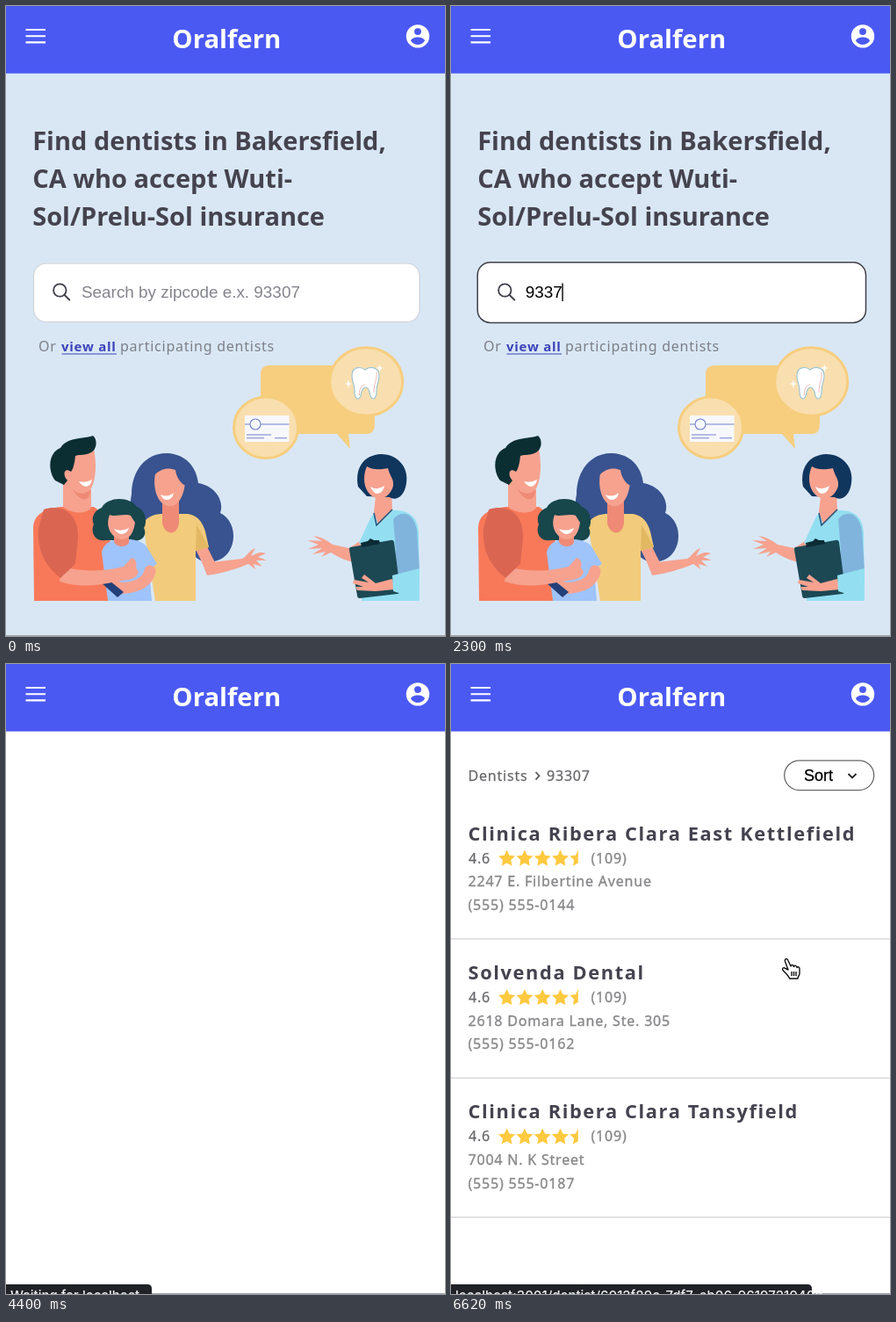
These frames come from a looping animation (500x717 px, 6740 ms). An HTML page:

```html
<!DOCTYPE html>
<html lang="en">
<head>
<meta charset="utf-8">
<title>Dentist finder</title>
<style>
html, body { margin: 0; width: 100%; height: 100%; overflow: hidden; background: #fff; }
svg { display: block; width: 500px; height: 717px; font-family: "Noto Sans", "Open Sans", sans-serif; }
.brand { font-size: 29.3px; font-weight: 700; fill: #fff; }
.hero { font-size: 29px; font-weight: 700; fill: #45434f; }
.hint { font-size: 16px; letter-spacing: .75px; fill: #7d7f87; }
.link { font-size: 15px; font-weight: 600; fill: #3b43b8; }
.field { font: 18.9px "Liberation Sans", Arial, sans-serif; }
.sort { font-size: 18px; stroke: #000; stroke-width: .3px; }
.option { font: 17px Inter, sans-serif; fill: #f1f1f2; }
.status { font: 500 15px Inter, sans-serif; fill: #f1f2f4; }
.name { font-size: 21.8px; font-weight: 700; letter-spacing: 1.62px; fill: #45434f; }
.info { font-size: 16px; letter-spacing: .8px; fill: #88888b; stroke: #88888b; stroke-width: .35px; }
.info.dark { fill: #68686c; stroke: #68686c; stroke-width: .25px; }
.skin { fill: #f6a28f; }
.skinline { fill: none; stroke: #f6a28f; stroke-linecap: round; stroke-linejoin: round; }
.shade { fill: #ee8a76; }
</style>
</head>
<body>
<svg viewBox="0 0 500 717" xmlns="http://www.w3.org/2000/svg">
  <rect id="page" width="500" height="717"/>

  <g id="home">
    <g class="hero">
      <text x="30.2" y="163.5">Find dentists in Bakersfield,</text>
      <text x="30.2" y="206.5">CA who accept Wuti-</text>
      <text x="30.2" y="249.600">Sol/Prelu-Sol insurance</text>
    </g>
    <text class="hint" y="393"><tspan x="37">Or</tspan><tspan class="link" x="63">view all</tspan><tspan x="130">participating dentists</tspan></text>
    <path d="M63.5 396H126" stroke="#3b43b8" stroke-width="1.2"/>

    <!-- speech bubble -->
    <g>
      <path fill="#f6ce7e" d="M300 409H410Q420 409 420 419V477Q420 487 410 487H390L392 504L377 487H300Q290 487 290 477V419Q290 409 300 409Z"/>
      <g fill="#f9dfaf" stroke="#f6ce7e" stroke-width="3">
        <ellipse cx="410.2" cy="427.5" rx="41.5" ry="38.8"/>
        <ellipse cx="296" cy="479.700" rx="36.500" ry="34.800"/>
      </g>
      <path fill="#f7f8fc" d="M272 466H322.500V496H272Z"/>
      <g fill="none" stroke="#7482cc" stroke-width="1.1">
        <path d="M272 476H278M290 476H322.500M274 488H302M274 491.800H294M306 491.800H320"/>
        <circle cx="284" cy="476" r="6"/>
      </g>
      <path fill="#fff" stroke="#9cc4d2" stroke-width="1.200" d="M409 414C414 410 425 410 425 421C425 428 422 430 422 438C422 444 421 447 418 447C413 447 416 434 409.500 434C403 434 406 447 401 447C398 447 397 444 397 438C397 430 394 428 394 421C394 410 404 410 409 414Z"/>
      <path fill="none" stroke="#f0b9bd" d="M422 417C423 425 419 429 419 440M402.500 443C402 436 405 431 409 431"/>
      <path fill="#fff" d="M390 425L391 429L394 430L391 431L390 435L389 431L386 430L389 429ZM425.500 408L426.600 411L430 412L426.600 413L425.500 417L424.400 413L421 412L424.400 411Z"/>
    </g>

    <!-- mother -->
    <path fill="#38538f" d="M143 556C143 528 160 508 184 509C204 510 217 524 219 543C238 546 249 563 244 577C265 587 264 623 241 631C228 635 218 632 212 622L160 602C146 592 139 572 143 556Z"/>
    <path class="skinline" stroke-width="13" d="M223 618L233 638"/>
    <path class="skin" d="M222 630L229 648C245 646 262 641 276 635L284 641L282 635L292 638L285 631L297 631L287 627L296 623C288 620 284 624 279 626L284 617C277 619 274 627 269 629L235 633Z"/>
    <path fill="#f3cb7c" d="M156 589C162 579 172 578 181 578H207C219 580 224 588 227 598L231 616L216 620V677H170Z"/>
    <path fill="#e2b962" d="M217 590L231 616L216 620Z"/>
    <path class="shade" d="M178 562H197V588C196 602 182 604 178 589Z"/>
    <path class="skin" d="M170 532C174 521 190 520 194 529L204 543C202 560 195 571 184 569C172 566 167 548 170 532Z"/>
    <path fill="#38538f" d="M168 535C173 518 187 514 199 523L205 546C199 544 194 536 193 528C185 525 176 526 168 535Z"/>
    <path fill="#fff" d="M176 556Q184 560 191 554Q189 563 182 562Q178 561 176 556Z"/>

    <!-- man -->
    <path fill="#f87959" d="M32 677L31 594C31 578 46 571 64 570H100C113 578 119 594 119 620V677Z"/>
    <path class="skin" d="M65 540L97 550V571C90 580 73 577 65 570Z"/>
    <path class="shade" d="M74 547L96 551C96 565 84 566 74 547Z"/>
    <path class="skin" d="M72 512L100 504C103 520 103 535 98 547C93 557 82 557 74 548L66 545V522Z"/>
    <path fill="#0b2e33" d="M56 540C48 530 47 509 62 503C70 490 88 493 99 489C105 494 103 505 97 508C90 512 84 510 79 512C78 522 76 528 74 530C66 524 64 534 70 540L66 545Z"/>
    <path fill="#fff" d="M83 541Q91 543 98 539Q97 546 91 547Q86 546 83 541Z"/>

    <!-- girl -->
    <path fill="#17464b" d="M100 590C96 580 103 573 109 571C116 558 141 558 149 570C160 574 161 589 157 594C162 604 152 611 143 608H113C101 610 96 598 100 590Z"/>
    <path fill="#9fc3fb" d="M109 622C112 609 123 607 133 607C149 606 159 611 163 620L172 635L163 641L166 677H116Z"/>
    <path class="shade" d="M123 598H140V611C136 617 126 616 123 610Z"/>
    <path class="skin" d="M118 579C123 582 136 577 142 580L147 588C145 602 139 608 130 607C119 604 113 592 118 579Z"/>
    <path fill="#fff" d="M123 595Q131 599 140 594Q138 601 131 601Q126 600 123 595Z"/>
    <path class="skinline" stroke-width="13" d="M164 643C161 658 143 664 125 662"/>
    <path class="skin" d="M107 655L114 650L132 659L128 673L121 666Z"/>
    <path fill="#234079" d="M113 650L134 667L127 673L108 656Z"/>
    <path class="skin" d="M117 652L132 656L133 664Z"/>

    <!-- man's arm -->
    <path class="skin" d="M63 638C90 645 115 643 134 638L143 628C149 629 149 636 148 639L151 644C148 654 137 653 126 655C104 660 82 662 61 655Z"/>
    <path fill="#da6652" d="M43 573C65 566 83 578 82 606L79 635L62 651C44 637 35 618 37 594Z"/>

    <!-- dentist -->
    <path class="skin" d="M410 621L396 633C385 631 377 626 370 622L359 627L364 621L349 624L360 617L344 618L356 613L343 608L360 609L350 603C358 604 366 608 372 613L391 617L409 605Z"/>
    <path fill="#93dff1" d="M416 581C425 573 434 572 443 574C460 574 469 582 470 600L471 677H405L409 617L402 611Z"/>
    <path fill="#81b4dc" d="M441 584C450 573 464 576 468 596L471 642L443 648L444 620Z"/>
    <path class="skin" d="M421 558L439 550L440 574L424 590L419 576Z"/>
    <path fill="none" stroke="#24517d" stroke-width="1.500" d="M419 577L422 591L440 573"/>
    <path fill="#10365e" d="M401 547C397 525 408 511 427 510C447 510 459 526 456 543C454 558 444 564 437 559L411 558Z"/>
    <path class="skin" d="M411 524C418 529 430 527 435 526C437 535 442 538 441 546C439 555 431 562 422 560C410 557 404 540 411 524Z"/>
    <path fill="#fff" d="M415 547Q423 552 431 546Q429 555 422 555Q418 554 415 547Z"/>
    <path fill="#1c4854" d="M392 616L438 608Q441 607 442 610L449 665Q449 668 446 669L403 674Q400 674 400 671L391 619Q391 616 392 616Z"/>
    <path fill="#0c2b35" d="M404 611L412 609L415 606L419 608L425 608L426 612L405 616Z"/>
    <path class="skin" d="M440 652L421 657L408 647L405 651L413 656L396 653L395 657L407 661L398 661L400 665L421 666L443 664Z"/>
    <path fill="#93dff1" d="M440 648L471 640V663C465 671 451 670 441 666Z"/>

    <!-- search field -->
    <rect id="box" fill="#fff"/>
    <g fill="none" stroke="#3f3e49" stroke-width="1.800" stroke-linecap="round">
      <circle cx="61.300" cy="323.500" r="7.200"/><path d="M66.700 329L72.300 334.500"/>
    </g>
    <text id="query" class="field" y="332.300"></text>
    <path id="caret" stroke="#000" stroke-width="1.400"/>
    <g id="menu">
      <path fill="#282b2e" d="M181 373L191.500 361.500Q193.500 359.500 195.500 361.500L206 373Z"/>
      <rect id="menuBox" x="164.500" y="372" width="97" rx="5" fill="#282b2e"/>
      <g id="options"></g>
    </g>
  </g>

  <g id="results">
    <text class="info dark" y="132.700"><tspan x="19.500">Dentists</tspan><tspan x="109">93307</tspan></text>
    <path d="M96.500 123L100.500 127.300L96.500 131.600" fill="none" stroke="#5c5c61" stroke-width="1.800"/>
    <rect x="379.700" y="109.800" width="102" height="33.800" rx="16.900" fill="#fff" stroke="#68686c" stroke-width="1.300"/>
    <text x="402" y="133" class="field sort">Sort</text>
    <path d="M452.500 125L457 129.500L461.500 125" fill="none" stroke="#222" stroke-width="1.800"/>
    <g id="cards"></g>
    <path id="hand" fill="#fff" stroke="#111" stroke-width="1.400" stroke-linejoin="round" d="M384 348L380.500 338.500C379.500 335.500 383 334.500 384 337.500L387 344C387 342 390 342 390.500 344.500C391 342.500 394 343 394 345.500C395 344 397 345 397 347V352C397 355 395 355 395 358H385.500C385 355 381 352 378 348.500C376.500 346 379 345 381 346.500ZM388 350V355M390.500 350V355M393 350V355"/>
  </g>

  <path d="M0 716.500H500" stroke="#a3a5a9"/>
  <g id="status">
    <path id="statusBar" fill="#202227"/>
    <text id="statusText" class="status" x="5" y="723.500"></text>
  </g>

  <rect width="500" height="76.700" fill="#4b59f3"/>
  <path d="M22.500 27H45M22.500 34.200H45M22.500 41.400H45" stroke="#fff" stroke-width="2.100"/>
  <text class="brand" x="251.300" y="47.800" text-anchor="middle">Oralfern</text>
  <g transform="translate(469 34.400) scale(1.32)" fill="#4b59f3">
    <circle r="10" fill="#fff"/>
    <circle cy="-4" r="3"/>
    <path d="M0 7.200C-2.500 7.200 -4.700 5.900 -6 4C-6 2 -2 .9 0 .9S6 2 6 4C4.700 5.900 2.500 7.200 0 7.200Z"/>
  </g>
</svg>

<script>
const LOOP = 6740;
const FOCUS = 900, SUBMIT = 3500, LEAVE = 4400, LIST = 4500, HOVER = 4600, EXPAND = 6100;
const DIGIT = 10.51;
const pastQueries = ['93313', '93307', '9', '92371', '93'];
const typing = [[0, ''], [1300, '9'], [1700, '93'], [1900, '933'], [2100, '9337'],
                [2500, '933'], [2700, '9330'], [2900, '93307']];
const clinics = [
  ['Clinica Ribera Clara East Kettlefield', '2247 E. Filbertine Avenue', '(555) 555-0144'],
  ['Solvenda Dental', '2618 Domara Lane, Ste. 305', '(555) 555-0162'],
  ['Clinica Ribera Clara Tansyfield', '7004 N. K Street', '(555) 555-0187']
];

const el = id => document.getElementById(id);
const show = (id, on) => { el(id).style.display = on ? '' : 'none'; };
const set = (id, attrs) => {
  for (const key in attrs) el(id).setAttribute(key, attrs[key]);
};
const write = (id, text) => {
  if (el(id).textContent !== text) el(id).textContent = text;
};

// Runs counterclockwise from the top, so 6 corners give the left half.
function star(cx, cy, corners) {
  const points = Array.from({ length: corners }, (_, i) => {
    const angle = -Math.PI / 2 - i * Math.PI / 5, r = i % 2 ? 4.9 : 10;
    return `${(cx + r * Math.cos(angle)).toFixed(2)},${(cy + r * Math.sin(angle)).toFixed(2)}`;
  });
  return `<polygon points="${points.join(' ')}" fill="#ffc940"/>`;
}

el('cards').innerHTML = clinics.map(([name, address, phone], i) => {
  const stars = [0, 1, 2, 3, 4].map(n => star(63.6 + 20.3 * n, 221.6, n < 4 ? 10 : 6)).join('');
  return `<g transform="translate(0 ${158.4 * i})">
    <text class="name" x="19.5" y="200.5">${name}</text>
    <text class="info dark" x="20" y="226.7">4.6</text>${stars}
    <text class="info" x="159.5" y="226.7">(109)</text>
    <text class="info" x="19.5" y="253.2">${address}</text>
    <text class="info" x="19.5" y="280">${phone}</text>
    <path d="M0 312.8H500" stroke="#d2d2d4" stroke-width="1.2"/></g>`;
}).join('');

function drawField(t) {
  const focused = t >= FOCUS;
  const query = typing.filter(([at]) => t >= at).pop()[1];
  set('box', focused
    ? { x: 30.2, y: 291.8, width: 442.3, height: 68.6, rx: 14.5, stroke: '#3f3e49', 'stroke-width': 1.5 }
    : { x: 31.5, y: 293, width: 439.5, height: 66.5, rx: 14, stroke: '#d0d1d7', 'stroke-width': 1.2 });
  write('query', query || 'Search by zipcode e.x. 93307');
  set('query', query ? { x: 84.7, fill: '#000' } : { x: 86, fill: '#84858c' });
  const x = 85 + DIGIT * query.length;
  set('caret', { d: `M${x} 315.5V336` });
  show('caret', focused && t < SUBMIT);

  const matches = query ? pastQueries.filter(zip => zip.startsWith(query)) : [];
  const open = matches.length > 0 && matches[0] !== query;
  show('menu', open);
  if (!open) return;
  set('menuBox', { height: 11.5 + 48.5 * matches.length });
  el('options').innerHTML = matches.map((zip, i) =>
    `<text class="option" x="180.5" y="${408.2 + 48.5 * i}">${zip}</text>`).join('');
}

function drawStatus(t) {
  show('status', t >= SUBMIT);
  const k = Math.min(1, Math.max(0, (t - EXPAND) / 300));
  const w = 166 + 245 * (1 - (1 - k) ** 2);
  set('statusBar', { d: `M0 706H${w - 5}Q${w} 706 ${w} 711V717H0Z` });
  write('statusText', t < HOVER ? 'Waiting for localhost...'
    : k === 0 ? 'localhost:3001/d/...'
    : 'localhost:3001/dentist/6012f89c-7df7-eb06-9619721040d'.slice(0, Math.floor((w - 12) / 7.5)));
}

function render(t) {
  const home = t < LEAVE;
  set('page', { fill: home ? '#d9e7f5' : '#fff' });
  show('home', home);
  show('results', t >= LIST);
  show('hand', t >= HOVER);
  if (home) drawField(t);
  drawStatus(t);
}

const start = performance.now();
function tick() {
  render((performance.now() - start) % LOOP);
  requestAnimationFrame(tick);
}
tick();
</script>
</body>
</html>
```
